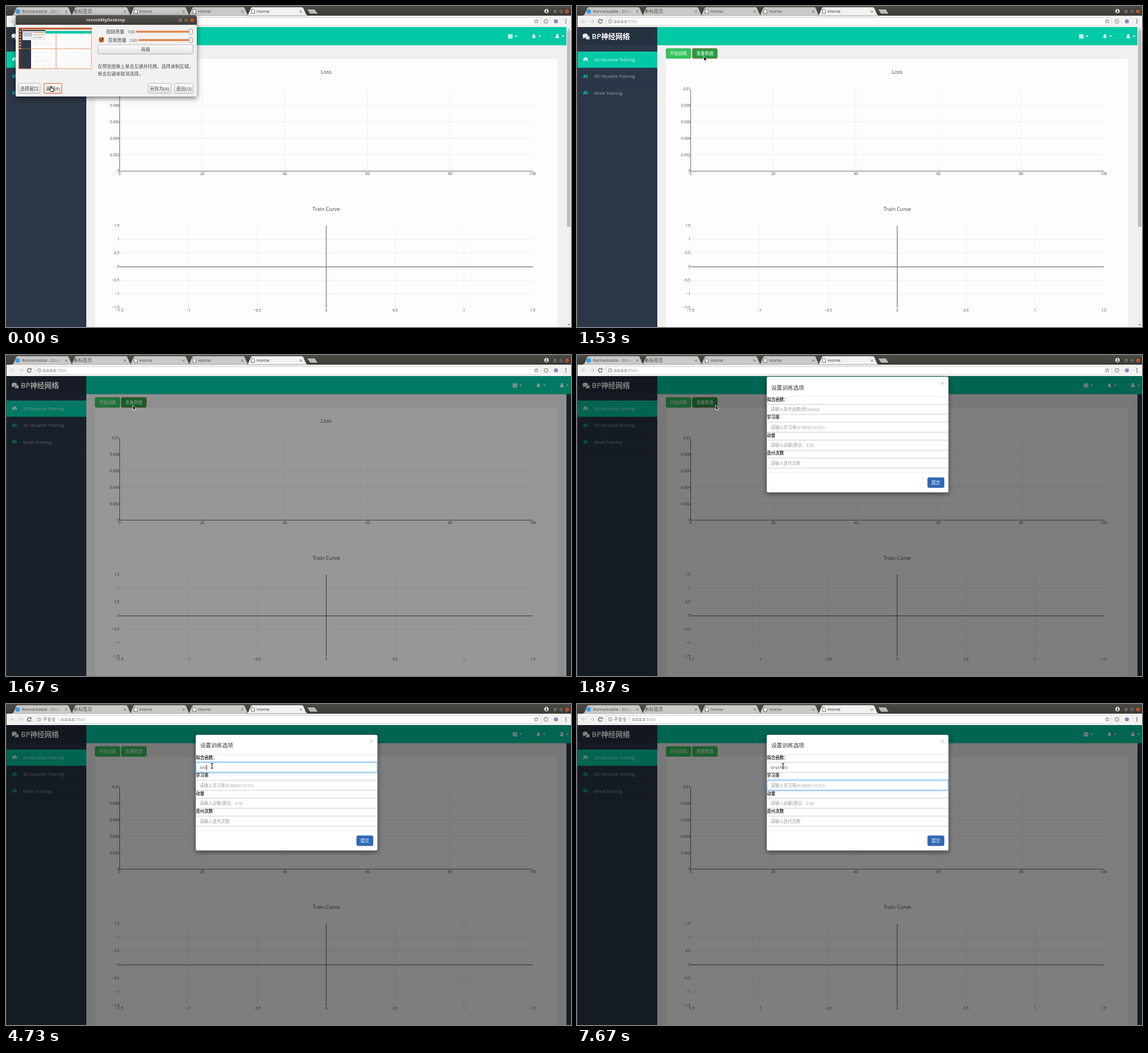
These frames come from a looping animation (992x564 px, 8 s). An HTML page with a canvas:

```html
<!DOCTYPE html>
<html lang="zh">
<head>
<meta charset="utf-8">
<title>BP神经网络</title>
<style>
html, body { margin: 0; width: 100%; height: 100%; overflow: hidden; background: #3c3b37; }
canvas { display: block; }
</style>
</head>
<body>
<canvas id="stage" width="992" height="564"></canvas>
<script>
const c = document.getElementById('stage').getContext('2d');
const LOOP = 8000;
const FONT = '"Open Sans", "Noto Sans CJK SC", "Noto Sans CJK", sans-serif';
const TEAL = '#00caa5', NAVY = '#2b3647', CHROME = '#f2f1f0', ORANGE = '#e0793a';

const clamp = v => Math.max(0, Math.min(1, v));
const ramp = (t, a, b) => clamp((t - a) / (b - a));

function rect(x, y, w, h, fill) {
  c.fillStyle = fill;
  c.fillRect(x, y, w, h);
}

function box(x, y, w, h, r, fill, stroke, lw = 1) {
  c.beginPath();
  c.roundRect(x, y, w, h, r);
  if (fill) { c.fillStyle = fill; c.fill(); }
  if (stroke) { c.strokeStyle = stroke; c.lineWidth = lw; c.stroke(); }
}

function poly(points, fill, stroke, lw = 1) {
  c.beginPath();
  points.forEach(([x, y], i) => i ? c.lineTo(x, y) : c.moveTo(x, y));
  if (fill) { c.closePath(); c.fillStyle = fill; c.fill(); }
  if (stroke) { c.strokeStyle = stroke; c.lineWidth = lw; c.stroke(); }
}

function disc(x, y, r, fill, stroke, lw = 1) {
  c.beginPath();
  c.arc(x, y, r, 0, 7);
  if (fill) { c.fillStyle = fill; c.fill(); }
  if (stroke) { c.strokeStyle = stroke; c.lineWidth = lw; c.stroke(); }
}

// y is the optical middle of the line
function text(s, x, y, size, color, align = 'left', weight = 400) {
  c.font = `${weight} ${size}px ${FONT}`;
  c.textAlign = align;
  c.fillStyle = color;
  c.fillText(s, x, y + size * 0.36);
  return c.measureText(s).width;
}

function cross(x, y, r, color) {
  poly([[x - r, y - r], [x + r, y + r]], null, color);
  poly([[x + r, y - r], [x - r, y + r]], null, color);
}

// ---------- browser frame ----------

function tab(x, title, icon, active) {
  const bg = active ? CHROME : '#cbc9c7';
  poly([[x, 17], [x + 3, 15], [x + 8, 3.5], [x + 10, 2], [x + 98, 2], [x + 100, 3.5], [x + 105, 15], [x + 108, 17]],
    bg, '#76736f', 0.6);
  if (icon === 'page') {
    poly([[x + 9, 6], [x + 12.5, 6], [x + 14.5, 8], [x + 14.5, 13], [x + 9, 13]], '#fff');
    poly([[x + 9, 6], [x + 12.5, 6], [x + 14.5, 8], [x + 14.5, 13], [x + 9, 13], [x + 9, 6]], null, '#5c5c5c', 0.9);
  } else if (icon === 'dot') {
    disc(x + 10.5, 9.5, 4, '#3a9fe0');
  }
  const tx = x + { page: 18, dot: 18, none: 6 }[icon];
  c.save();
  c.beginPath();
  c.rect(tx, 2, x + 88 - tx, 15);
  c.clip();
  text(title, tx, 9.5, 8, active ? '#333' : '#4a4a4a');
  if (icon === 'dot') {
    const fade = c.createLinearGradient(x + 70, 0, x + 88, 0);
    fade.addColorStop(0, '#cbc9c700');
    fade.addColorStop(1, bg);
    rect(x + 70, 4, 18, 12, fade);
  }
  c.restore();
  cross(x + 95.8, 9.7, 1.8, '#666');
}

function drawFrame(t) {
  const bar = c.createLinearGradient(0, 0, 0, 17);
  bar.addColorStop(0, '#4a4944');
  bar.addColorStop(1, '#3c3b37');
  rect(0, 0, 992, 17, bar);
  tab(319, 'Home', 'page');
  tab(216, 'Home', 'page');
  tab(113, '新标签页', 'none');
  tab(10, 'Remarkable - Download', 'dot');
  poly([[529, 6], [542, 6], [547, 13.5], [534, 13.5]], '#bcbab7');
  rect(1, 17, 991, 20, CHROME);
  tab(422, 'Home', 'page', true);

  disc(949, 9, 3.8, '#f0efed');
  disc(949, 7.9, 1.2, '#3c3b37');
  rect(947, 9.8, 4, 1.6, '#3c3b37');
  [964, 974.5].forEach(x => disc(x, 9.5, 3.8, '#74726b', '#33322e'));
  rect(962.3, 9, 3.4, 1, '#3c3b37');
  box(973, 8, 3, 3, 0, null, '#3c3b37', 0.8);
  disc(985, 9.5, 3.8, '#e9622f', '#33322e');
  cross(985, 9.5, 1.4, '#4a2114');

  const arrow = (x, d) => {
    poly([[x - 3.5 * d, 27], [x + 3.5 * d, 27]], null, '#c2c1c0');
    poly([[x, 23.5], [x + 3.5 * d, 27], [x, 30.5]], null, '#c2c1c0');
  };
  arrow(11.5, -1);
  arrow(26.5, 1);
  c.beginPath();
  c.arc(41, 27, 3.2, 0.4, 5.4);
  c.strokeStyle = '#555'; c.lineWidth = 1.2; c.stroke();
  poly([[41.5, 26.3], [44.8, 26.3], [44.8, 23]], '#555');

  box(51.5, 20.5, 887, 13.5, 1.5, '#fff', '#cfcdcb', 0.8);
  disc(58.3, 27, 3.3, null, '#666', 0.8);
  rect(57.9, 26.4, 0.9, 2.3, '#666');
  rect(57.9, 24.9, 0.9, 0.9, '#666');
  let x = 65;
  if (t >= 3530) {
    text('不安全', 65, 27, 7.5, '#666');
    rect(92, 23, 0.8, 8, '#bbb');
    x = 97;
  }
  x += text('0.0.0.0', x, 27, 7.3, '#333');
  text(':5500', x, 27, 7.3, '#999');

  const star = [];
  for (let i = 0; i <= 10; i++) {
    const r = i % 2 ? 1.7 : 3.9, a = i * Math.PI / 5 - Math.PI / 2;
    star.push([931 + r * Math.cos(a), 27 + r * Math.sin(a)]);
  }
  poly(star, null, '#666', 0.8);
  disc(948, 27, 3.3, '#e4e3e3', '#a4a3a3', 1.4);
  disc(965.5, 27, 3.6, '#7d8fb5');
  [24, 27, 30].forEach(y => disc(983, y, 0.9, '#555'));
}

// ---------- page ----------

function gauge(x, y, fill, needle) {
  c.beginPath();
  c.arc(x, y + 0.5, 4, Math.PI * 0.85, Math.PI * 2.15);
  c.closePath();
  c.fillStyle = fill; c.fill();
  poly([[x, y + 1.5], [x + 0.9, y - 2]], null, needle, 0.9);
  disc(x, y + 1.3, 0.9, needle);
}

function drawSidebar() {
  rect(1, 37, 140, 527, NAVY);
  rect(1, 37, 140, 32, '#263140');
  c.fillStyle = '#fff';
  c.beginPath();
  c.ellipse(14.5, 52, 4.8, 3.6, 0, 0, 7);
  c.fill();
  poly([[11, 54], [10.3, 57.3], [14, 55.5]], '#fff');
  c.beginPath();
  c.ellipse(18, 55.2, 4.2, 3.1, 0, -0.9, 2.4);
  c.fill();
  poly([[18.5, 57.5], [22, 59], [21.5, 56]], '#fff');
  text('BP神经网络', 26, 53, 12.7, '#fff', 'left', 600);

  rect(1, 80, 140, 28.5, TEAL);
  [138, 167.5].forEach(y => rect(1, y, 140, 0.7, '#252f3e'));
  gauge(15, 94, '#e8fffa', TEAL);
  gauge(15, 124, '#12a48f', NAVY);
  gauge(15, 153, '#12a48f', NAVY);
  text('2D Visualize Training', 30, 94, 7.5, '#dcfaf4');
  text('3D Visualize Training', 30, 123.5, 7.5, '#a0a9b5');
  text('Mnist Training', 30, 153, 7.5, '#a0a9b5');
}

function drawHeader(shift) {
  rect(141, 37, 843 + shift, 32, TEAL);
  c.save();
  c.translate(shift, 0);
  [50, 52.5, 55].forEach(y => rect(881.5, y, 8, 1.9, '#fff'));
  [895.5, 937, 978].forEach(x => poly([[x - 2.2, 52], [x + 2.2, 52], [x, 54.4]], '#fff'));
  poly([[923.3, 55.5], [924.6, 53.5], [925, 50.8], [926.8, 49.5], [928.6, 50.8], [929, 53.5], [930.3, 55.5]], '#fff');
  disc(926.8, 56, 1, '#fff');
  disc(968, 51.2, 1.9, '#fff');
  box(964.8, 53, 6.4, 3.4, [2, 2, 1, 1], '#fff');
  c.restore();
}

const GRID = '#efeeef', AXIS = '#747374', TICK = '#444';
const tick = (s, x, y, align) => text(s, x, y, 6.45, TICK, align);
const minus = v => String(v).replace('-', '−');

function drawCharts() {
  const L = 199.5, R = 925, W = R - L, mid = (L + R) / 2;
  text('Loss', mid, 116, 9.1, TICK, 'center');
  for (let i = 0; i <= 5; i++) {
    const x = L + W * i / 5, y = 290 - 28.8 * i;
    if (i && i < 5) {
      rect(x - 0.5, 146, 1, 144, GRID);
      rect(L, y - 0.5, W, 1, GRID);
    }
    tick(String(i * 20), x, 295, 'center');
    tick(String(i * 2 / 1000), 199, y, 'right');
  }
  rect(L - 0.5, 146, 1.1, 144.5, AXIS);
  rect(L - 0.5, 289.6, W + 0.5, 1.1, AXIS);

  text('Train Curve', mid, 356.3, 9.1, TICK, 'center');
  for (let i = 0; i <= 6; i++) {
    const x = L + W * i / 6, y = 530 - 24 * i, label = minus(i / 2 - 1.5);
    if (i && i < 6) {
      rect(x - 0.5, 386, 1, 144, GRID);
      rect(L, y - 0.5, W, 1, GRID);
    }
    tick(label, x, 535, 'center');
    tick(label, 199, y, 'right');
  }
  rect(mid - 0.6, 386, 1.2, 144, AXIS);
  rect(L, 457.8, W, 1.2, AXIS);
}

function drawPage(t, cursor) {
  const locked = t >= 1600;
  rect(1, 37, 991, 527, NAVY);
  rect(141, 69, 843, 495, '#f1f0f1');
  rect(156.5, 93, 811.5, 471, '#fefdfe');
  drawSidebar();
  drawHeader(locked ? 8 : 0);
  const over = cursor.x > 202 && cursor.x < 247 && cursor.y > 74 && cursor.y < 93;
  const pressed = t >= 1400 && t < 2300;
  box(156.5, 74.8, 43.5, 17.2, 2, '#36c25c', '#2fb054', 0.8);
  box(202.7, 74.8, 43.5, 17.2, 2, over || pressed ? '#219e41' : '#36c25c', pressed ? '#8a5a2c' : '#2fb054', 0.9);
  text('开始训练', 178.2, 83.3, 7.5, '#fff', 'center');
  text('准备数据', 224.4, 83.3, 7.5, '#fff', 'center');
  drawCharts();
  if (!locked) {
    rect(984, 37, 8, 527, '#f1f0f0');
    rect(985, 43.5, 6, 344.5, '#bebdbd');
    poly([[986.3, 42], [989.7, 42], [988, 40]], '#777');
    poly([[986.3, 559], [989.7, 559], [988, 561]], '#444');
  }
  const dim = 0.5 * ramp(t, 1550, 1700);
  if (dim) rect(1, 37, 991, 527, `rgba(0,0,0,${dim})`);
}

// ---------- dialog ----------

const FIELDS = [
  ['拟合函数：', '请输入拟合函数(例:sin(x))'],
  ['学习率', '请输入学习率(0.00001-0.01)'],
  ['动量', '请输入动量(建议：0.9)'],
  ['迭代次数', '请输入迭代次数']
];
const FORMULA = 'sin(x*pi)';
const KEYS = [3530, 3670, 3870, 4730, 5130, 5300, 5800, 6400, 6600];
const FOCUS = 2630, NEXT = 7130;

// bezier ease-out with control points (0,0) and (.58,1)
function easeOut(p) {
  let a = 0, b = 1;
  for (let i = 0; i < 20; i++) {
    const u = (a + b) / 2;
    if (3 * (1 - u) * u * u * 0.58 + u ** 3 < p) a = u; else b = u;
  }
  return 3 * (1 - a) * a * a + a ** 3;
}

function drawDialog(t) {
  if (t < 1720) return;
  const typed = FORMULA.slice(0, KEYS.filter(k => k <= t).length);
  const focus = t >= NEXT ? 1 : t >= FOCUS ? 0 : -1;
  const last = Math.max(...[FOCUS, ...KEYS, NEXT].filter(k => k <= t));
  const caretOn = (t - last) % 1000 < 500;

  c.save();
  c.beginPath();
  c.rect(1, 37, 991, 527);
  c.clip();
  c.globalAlpha = ramp(t, 1720, 1870);
  c.translate(0, -51 * (1 - easeOut(ramp(t, 1720, 2020))));
  c.save();
  c.shadowColor = 'rgba(0,0,0,.5)';
  c.shadowBlur = 8;
  c.shadowOffsetY = 2.5;
  box(333, 54, 319.3, 203.5, 3, '#fff');
  c.restore();
  box(333, 54, 319.3, 203.5, 3, null, 'rgba(0,0,0,.25)', 0.6);
  text('设置训练选项', 341, 73, 9.65, '#333');
  cross(641.5, 65.6, 2.2, '#aaa');
  rect(333, 88, 319, 0.8, '#e5e5e5');
  rect(333, 222.5, 319, 0.8, '#e5e5e5');

  FIELDS.forEach(([label, hint], i) => {
    const y = 111.3 + 31.5 * i, on = i === focus;
    text(label, 333.2, y - 17.3, 7.5, '#333', 'left', 700);
    c.save();
    if (on) { c.shadowColor = 'rgba(102,175,233,.6)'; c.shadowBlur = 4; }
    box(333.4, y - 8.8, 318.4, 17.6, 1.8, '#fff', on ? '#66a5dd' : '#c9c9c9', 0.9);
    c.restore();
    const value = i ? '' : typed;
    const w = text(value || hint, 340, y + 0.3, 7.5, value ? '#555' : '#999');
    if (on && caretOn) rect(339.7 + (value ? w : 0), y - 4.3, 0.8, 9, '#222');
  });
  box(615.8, 231.5, 28.6, 17.4, 2, '#3069b6', '#2a5da3', 0.8);
  text('提交', 630, 240.3, 7.5, '#fff', 'center');
  c.restore();
}

// ---------- recorder window ----------

function pushButton(label, x, y, w, h, active) {
  const g = c.createLinearGradient(0, y, 0, y + h);
  g.addColorStop(0, '#fcfcfb');
  g.addColorStop(1, '#e4e2e0');
  box(x, y, w, h, 2, g, active ? '#d98a55' : '#b5b2ae', active ? 1.4 : 0.9);
  text(label, x + w / 2, y + h / 2 + 0.3, 8, '#4a4a4a', 'center');
}

function slider(x, y) {
  box(x, y - 1.4, 328 - x, 2.8, 1.4, '#e38347', '#c96f38', 0.4);
  box(321.3, y - 4.7, 6.4, 9.6, 2.2, '#f2f1f0', '#918e8a', 0.8);
}

function drawPreview() {
  rect(22, 38, 128.5, 72.5, '#fbfafb');
  rect(22, 38, 128.5, 3, '#b85a32');
  rect(22, 41, 6, 69.5, '#4a3040');
  for (let i = 0; i < 7; i++) rect(23.5, 43 + 5 * i, 3, 3, i % 2 ? '#d98a55' : '#a9a4ab');
  rect(28, 41, 122.5, 3, '#e2e0e0');
  rect(28, 44, 16, 66.5, NAVY);
  rect(44, 44, 106.5, 4.5, TEAL);
  rect(28, 50, 16, 3.5, TEAL);
  rect(29, 42, 40, 18, '#efeeed');
  rect(29, 42, 40, 2.2, '#3c3b37');
  rect(30, 46, 16, 8, '#c3cbd0');
  rect(48, 46, 19, 1, ORANGE);
  rect(48, 50, 19, 1, '#c4c2c0');
  rect(48, 55, 15, 1, '#aaa');
  [[50, 65, 30], [50, 96, 30], [98, 84, 3]].forEach(([x, y, w]) => rect(x, y, w, 0.6, '#dddce0'));
  c.save();
  c.setLineDash([3, 1]);
  box(22.5, 38.5, 127.5, 71.5, 0, null, ORANGE);
  poly([[22, 75], [150, 75]], null, ORANGE, 1.2);
  poly([[88, 38], [88, 110]], null, ORANGE, 1.2);
  c.restore();
}

function drawRecorder(t) {
  const alpha = 1 - ramp(t, 130, 340);
  if (!alpha) return;
  c.save();
  c.globalAlpha = alpha;
  c.save();
  c.shadowColor = 'rgba(0,0,0,.55)';
  c.shadowBlur = 10;
  c.shadowOffsetY = 3;
  box(17, 16, 318, 143, [4, 4, 0, 0], CHROME);
  c.restore();
  const g = c.createLinearGradient(0, 16, 0, 33);
  g.addColorStop(0, '#55544e');
  g.addColorStop(1, '#3c3b37');
  box(17, 16, 318, 17, [4, 4, 0, 0], g);
  text('recordMyDesktop', 175, 24.5, 7.7, '#dfdbd2', 'center', 700);
  [306, 316.5].forEach(x => disc(x, 24.8, 3.9, '#7b7972', '#33322e'));
  rect(304.4, 24.3, 3.2, 1, '#3c3b37');
  box(315, 23.3, 3, 3, 0, null, '#3c3b37', 0.8);
  disc(327, 24.8, 3.9, '#e9622f', '#33322e');
  cross(327, 24.8, 1.4, '#4a2114');

  drawPreview();
  text('视频质量', 175.5, 45.5, 8.1, '#4a4a4a');
  text('100', 212.8, 45.5, 7.8, '#4a4a4a');
  slider(228.5, 45.2);
  box(163.5, 55.3, 8, 8, 1.5, '#d9763c', '#a85428', 0.8);
  poly([[165, 59], [167, 61.3], [170.8, 56]], null, '#4a2d1c', 1.3);
  text('音频质量', 179, 60, 8.1, '#4a4a4a');
  text('100', 216.8, 60, 7.8, '#4a4a4a');
  slider(232.5, 59.8);
  pushButton('高级', 161.5, 68, 167, 16.5);
  text('在预览图像上单击左键并托拽，选择录制区域。', 161, 106.5, 8, '#4a4a4a');
  text('单击右键来取消选择。', 161, 119, 8, '#4a4a4a');
  pushButton('选择窗口', 22, 136, 38, 17.5);
  pushButton('录制(R)', 66.5, 136, 31.5, 17.5, true);
  pushButton('另存为(A)', 249.5, 136, 40, 17.5);
  pushButton('退出(Q)', 296, 136, 32.5, 17.5);
  c.restore();
}

// ---------- pointer ----------

const PATH = [
  [0, 78, 141], [400, 78, 141], [930, 190, 105], [1270, 222.5, 88],
  [1740, 222.5, 88], [1870, 243, 88], [2330, 345, 102], [2600, 361.7, 109]
];

function pointer(t) {
  const i = PATH.findIndex(p => p[0] > t);
  if (i < 0) return { x: 361.7, y: 109 };
  const [a, b] = [PATH[i - 1], PATH[i]];
  const p = ramp(t, a[0], b[0]);
  return { x: a[1] + (b[1] - a[1]) * p, y: a[2] + (b[2] - a[2]) * p };
}

function drawPointer(t, { x, y }) {
  c.save();
  c.translate(x, y);
  c.lineJoin = 'round';
  if (t < 340) {
    const hand = [[0, 0], [1.5, 0], [1.8, 3.2], [5.5, 4], [6, 5.5], [5, 9.5], [0.8, 9.5], [-2, 5.8], [-0.8, 5], [0, 5.8], [0, 0]];
    poly(hand, '#fff');
    poly(hand, null, '#111', 1);
  } else if (t >= 2330) {
    const beam = [[-2, -4.5], [2, -4.5], [0, -4.5], [0, 4], [-2, 4], [2, 4]];
    poly(beam, null, '#fff', 1.9);
    poly(beam, null, '#222', 1.2);
  } else {
    const arrow = [[0, 0], [0, 8.6], [2, 6.8], [3.3, 9.8], [4.8, 9.1], [3.5, 6.3], [6, 6], [0, 0]];
    poly(arrow, '#111');
    poly(arrow, null, '#fff', 0.8);
  }
  c.restore();
}

function draw(t) {
  const cursor = pointer(t);
  drawFrame(t);
  drawPage(t, cursor);
  rect(0, 17, 1, 547, '#46443f');
  drawDialog(t);
  drawRecorder(t);
  drawPointer(t, cursor);
}

const start = performance.now();
function loop() {
  draw((performance.now() - start) % LOOP);
  requestAnimationFrame(loop);
}
loop();
</script>
</body>
</html>
```
